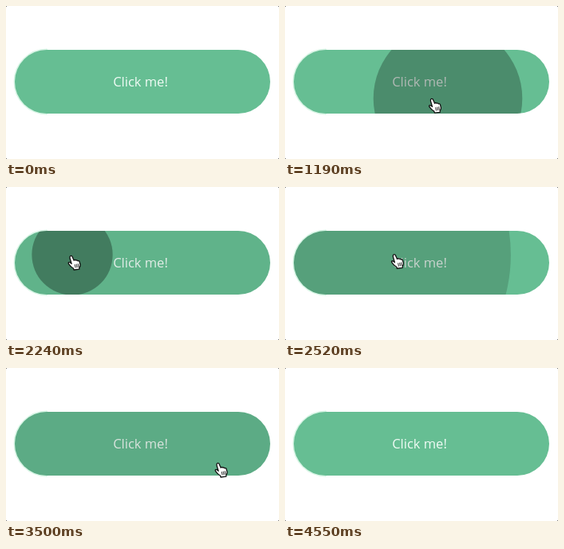
Write an HTML page with a canvas that moves like this. It is 342 px wide and 192 px high and loops after 4620 ms.

```html
<!DOCTYPE html>
<html lang="en">
<head>
<meta charset="utf-8">
<title>Ripple button</title>
<style>
  html, body { margin: 0; width: 100%; height: 100%; overflow: hidden; background: #fff; }
  canvas { display: block; width: 342px; height: 192px; }
</style>
</head>
<body>
<canvas id="stage"></canvas>
<script>
const W = 342, H = 192, LOOP = 4620, STEP = 70;
const canvas = document.getElementById('stage');
const ctx = canvas.getContext('2d');
const dpr = window.devicePixelRatio || 1;
canvas.width = W * dpr;
canvas.height = H * dpr;

const clicks = [
  { t: 1015, x: 204, y: 116 },
  { t: 1670, x: 111, y: 116 },
  { t: 2145, x: 83, y: 85 },
  { t: 3003, x: 275, y: 80.5 },
  { t: 3640, x: 264, y: 126 }
];

// Pointer stops: time, x, y of the fingertip
const stops = [
  [140, 228, 153], [420, 212, 128], [630, 205, 118], [840, 204, 115],
  [1080, 204, 115], [1350, 150, 118], [1610, 111, 115], [1730, 111, 115],
  [2060, 82, 86], [2310, 82, 86], [2900, 273, 80], [3080, 273, 80],
  [3500, 266, 119], [3640, 264, 125], [3720, 264, 126], [3920, 264, 138],
  [4200, 264, 176], [4340, 264, 200]
];

const pill = new Path2D();
pill.arc(51, 95, 40, Math.PI / 2, Math.PI * 1.5);
pill.arc(291, 95, 40, -Math.PI / 2, Math.PI / 2);
pill.closePath();

const hand = new Path2D(
  'M-1.9 1.2 Q-1 -.4 .7 .8 Q1.2 1.5 3.2 6.2 Q4.2 4.6 5.6 6.1 ' +
  'Q6.7 5.2 8 6.8 Q9.3 6.1 10.1 7.8 L11 11.5 Q11.2 13.5 9.8 15 ' +
  'L9.8 17.2 L3 18 L2.4 16 Q-.8 14.2 -2.8 11.3 Q-4.5 9.4 -3.4 8.6 ' +
  'Q-2 8 .1 10.3 L-2 3.2 Z');
const fingers = new Path2D('M4.3 11.5 L5 15 M6.3 11 L7 14.7 M8.3 10.6 L8.9 14.2');

function disc(x, y, r) {
  ctx.beginPath();
  ctx.arc(x, y, r, 0, Math.PI * 2);
}

function pointerAt(t) {
  const i = stops.findIndex(s => s[0] > t);
  if (i < 1) return null;
  const a = stops[i - 1], b = stops[i];
  const u = (t - a[0]) / (b[0] - a[0]);
  const e = u * u * (3 - 2 * u);
  return [a[1] + (b[1] - a[1]) * e, a[2] + (b[2] - a[2]) * e];
}

function drawButton() {
  ctx.save();
  ctx.beginPath();
  ctx.rect(0, 50, 52, 90);
  ctx.clip();
  ctx.strokeStyle = '#d8f5e5';
  ctx.lineWidth = 3;
  ctx.stroke(pill);
  ctx.restore();

  ctx.fillStyle = '#66be93';
  ctx.fill(pill);
  ctx.fillStyle = '#f0fbf5';
  ctx.font = '16.5px "Open Sans", "Noto Sans", sans-serif';
  ctx.textAlign = 'center';
  ctx.fillText('Click me!', 168.5, 101);
}

function drawRipples(t) {
  ctx.save();
  ctx.clip(pill);
  for (const c of clicks) {
    const age = t - c.t;
    if (age < 0 || age > 680) continue;
    ctx.fillStyle = `rgba(0,0,0,${0.36 * (1 - age / 680)})`;
    disc(c.x, c.y, Math.max(4, age * 0.533));
    ctx.fill();
  }
  ctx.restore();
}

function drawRings(t) {
  for (const c of clicks) {
    if (Math.abs(t - c.t) > 50) continue;
    disc(c.x, c.y, 30.3);
    ctx.strokeStyle = 'rgba(255,255,255,.35)';
    ctx.lineWidth = 3;
    ctx.stroke();
    ctx.strokeStyle = '#111';
    ctx.lineWidth = 1.5;
    ctx.stroke();
  }
}

function drawPointer(t) {
  const p = pointerAt(t);
  if (!p) return;
  ctx.save();
  ctx.translate(p[0], p[1]);
  ctx.lineJoin = ctx.lineCap = 'round';
  ctx.strokeStyle = '#111';
  ctx.fillStyle = '#fff';
  ctx.lineWidth = 1.3;
  ctx.fill(hand);
  ctx.stroke(hand);
  ctx.lineWidth = 0.9;
  ctx.stroke(fingers);
  ctx.restore();
}

function drawCorners() {
  ctx.fillStyle = '#777';
  for (const x of [0, W - 1])
    for (const y of [0, H - 1]) ctx.fillRect(x, y, 1, 1);
}

function frame(now) {
  const t = Math.floor((now % LOOP) / STEP) * STEP;
  ctx.setTransform(dpr, 0, 0, dpr, 0, 0);
  ctx.fillStyle = '#fff';
  ctx.fillRect(0, 0, W, H);
  drawButton();
  drawRipples(t);
  drawRings(t);
  drawPointer(t);
  drawCorners();
  requestAnimationFrame(frame);
}
requestAnimationFrame(frame);
</script>
</body>
</html>
```
